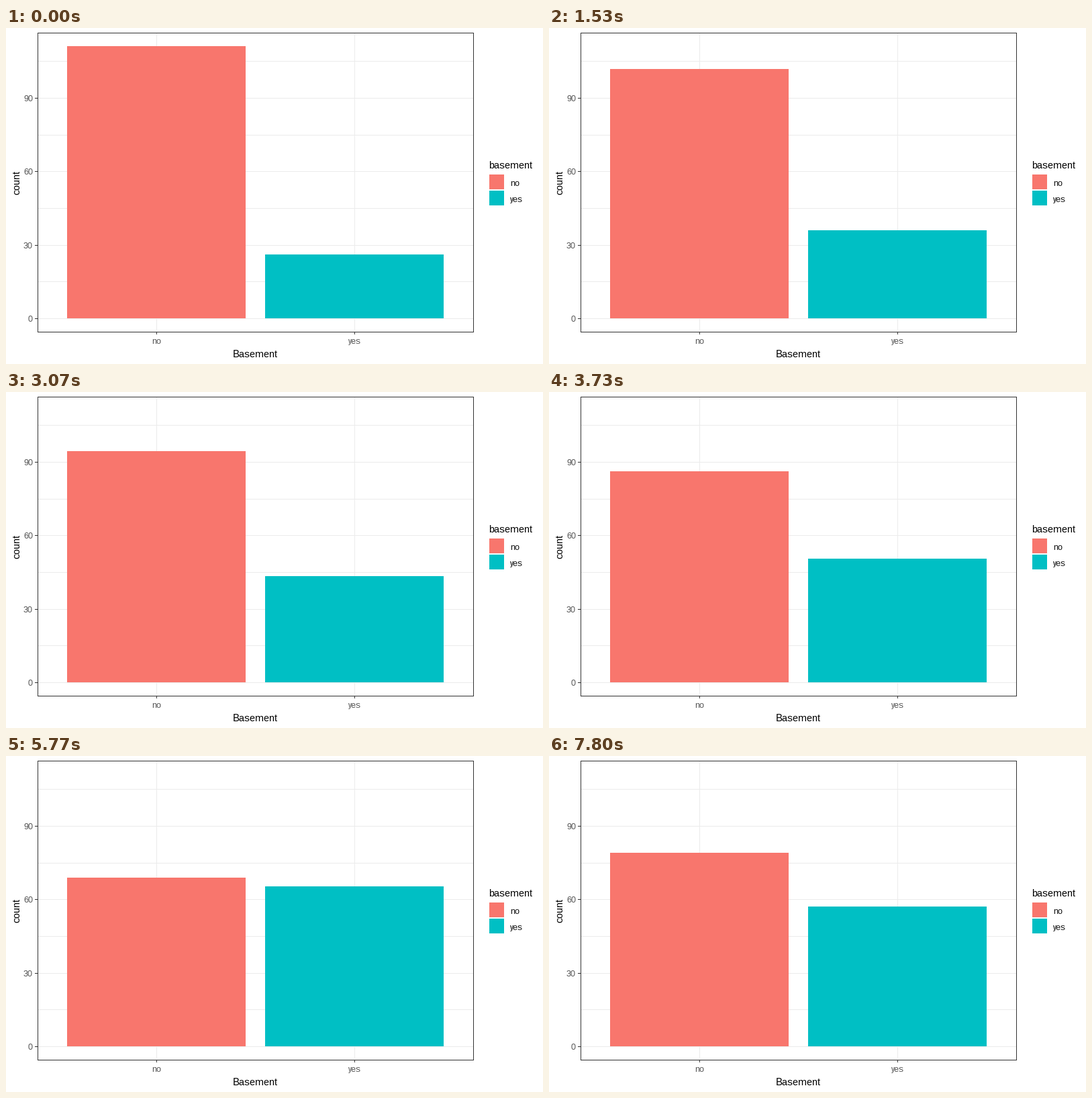
Animation of 800 by 500 pixels, one loop 10000 ms. Source, as a matplotlib script:

```python
import math

import matplotlib.pyplot as plt
from matplotlib.animation import FuncAnimation
from matplotlib.patches import Rectangle

plt.rcParams.update({
    "font.family": "Liberation Sans",
    "text.hinting": "native",
    "text.hinting_factor": 1,
    "toolbar": "None",
})

W, H, DPI = 800, 500, 100
LOOP, STEP = 10000, 20
FPS = 30

SALMON, TEAL = "#F8766D", "#00BFC4"
GRID, DARK, GREY = "#EBEBEB", "#333333", "#4D4D4D"

LEFT, RIGHT, TOP, BOTTOM = 47, 696, 7, 452
CENTERS = {"no": 224, "yes": 519}

# Tween frames at which each pair of counts is reached
KEYS = (0, 80, 159, 239)
COUNTS = ((111, 26), (96, 42), (68, 66), (79, 57))

fig = plt.figure(figsize=(W / DPI, H / DPI), dpi=DPI, facecolor="white")
ax = fig.add_axes([0, 0, 1, 1])
ax.set_xlim(0, W)
ax.set_ylim(H, 0)
ax.axis("off")


def y_pixel(count):
    return math.floor(431.86 - 3.6445 * count + 0.5)


def box(x0, y0, x1, y1, color, z=1):
    patch = Rectangle((x0, y0), x1 - x0, y1 - y0, facecolor=color,
                      linewidth=0, antialiased=False, zorder=z)
    return ax.add_patch(patch)


def label(x, y, text, px, color="black", ha="left", **kw):
    ax.text(x, y, text, fontsize=px * 72 / DPI, color=color,
            ha=ha, va="baseline", **kw)


def draw_panel():
    for count in range(0, 106, 15):
        y = y_pixel(count)
        box(LEFT, y, RIGHT, y + 1, GRID)
        if count % 30 == 0:
            box(LEFT - 4, y, LEFT, y + 1, DARK)
            label(40, y + 5, str(count), 12, GREY, "right")
    for name, x in CENTERS.items():
        box(x, TOP, x + 1, BOTTOM, GRID)
        box(x, BOTTOM, x + 1, BOTTOM + 4, DARK)
        label(x, 470, name, 12, GREY, "center")

    for y in (TOP, BOTTOM):
        box(LEFT, y, RIGHT + 1, y + 1, DARK, 3)
    for x in (LEFT, RIGHT):
        box(x, TOP, x + 1, BOTTOM + 1, DARK, 3)

    label(371.5, 490, "Basement", 15, ha="center")
    label(20, 248, "count", 15, rotation=90, rotation_mode="anchor")


def draw_legend():
    label(719, 209, "basement", 15)
    for y, name, color in ((218, "no", SALMON), (242, "yes", TEAL)):
        box(720, y, 742, y + 22, color)
        label(751, y + 17, name, 12)


def counts_at(k):
    k = min(k, KEYS[-1])
    i = 0
    while k > KEYS[i + 1]:
        i += 1
    u = (k - KEYS[i]) / (KEYS[i + 1] - KEYS[i])
    ease = (1 - math.cos(math.pi * u)) / 2
    return [a + (b - a) * ease for a, b in zip(COUNTS[i], COUNTS[i + 1])]


draw_panel()
draw_legend()
base = y_pixel(0)
bars = [box(91, base, 357, base, SALMON, 2), box(386, base, 652, base, TEAL, 2)]


def update(i):
    k = int((i * STEP + 14) * FPS / 1000)
    for bar, count in zip(bars, counts_at(k)):
        y = y_pixel(count)
        bar.set_y(y)
        bar.set_height(base - y)
    return bars


def reset():
    return update(0)


anim = FuncAnimation(fig, update, frames=LOOP // STEP, init_func=reset,
                     interval=STEP, repeat=True, repeat_delay=0, blit=False)
plt.show()
```
